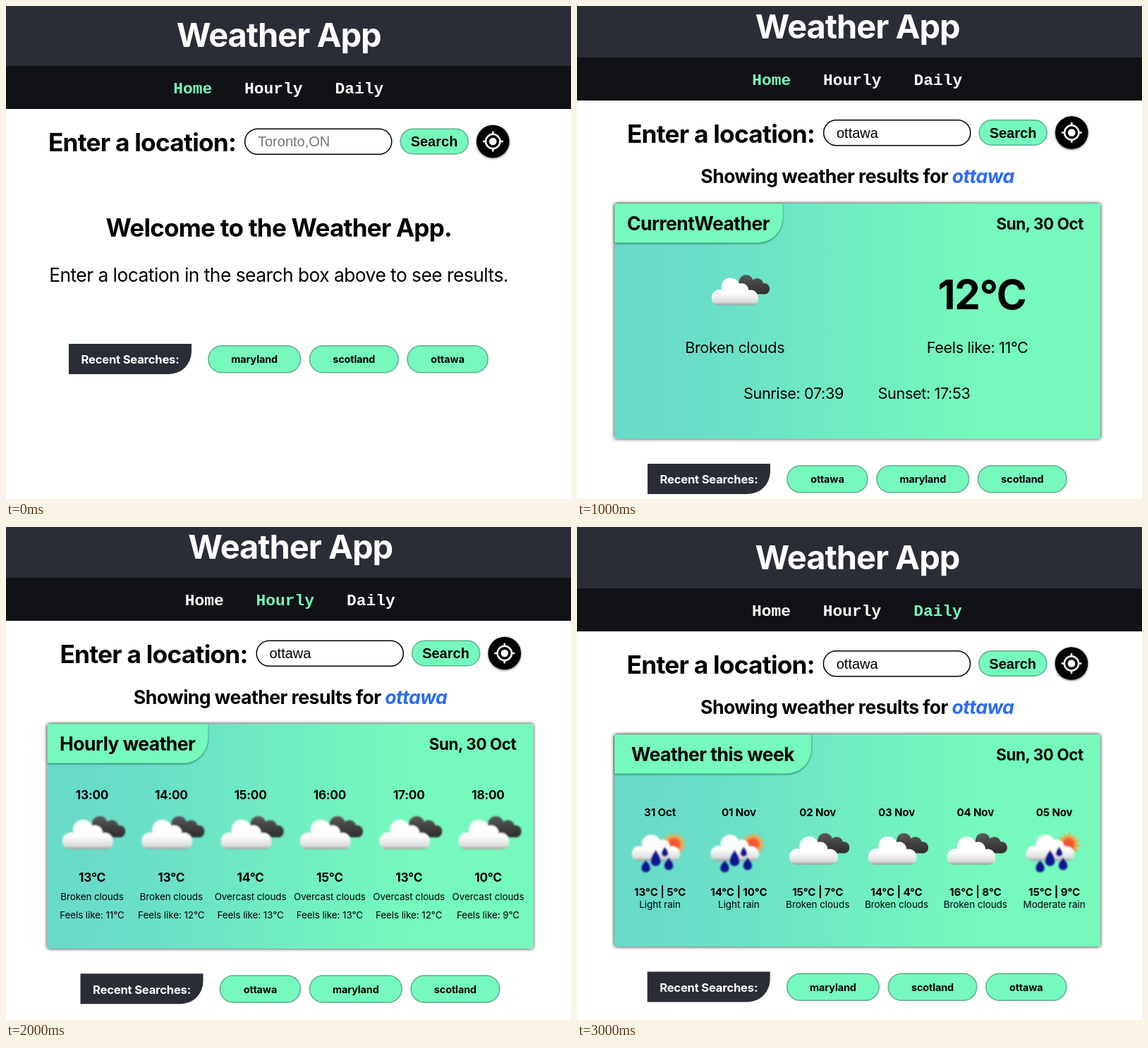
Animation of 801 by 699 pixels, one loop 4 s. Source, as an HTML page:

```html
<!DOCTYPE html>
<html lang="en">
<head>
<meta charset="utf-8">
<title>Weather App</title>
<style>
  html, body { margin: 0; width: 100%; height: 100%; overflow: hidden; background: #fff; }
  svg { display: block; width: 801px; height: 699px; }
  text { font-family: Inter, "Open Sans", sans-serif; text-anchor: middle; }
  .b { font-weight: 700; }
  .arial { font-family: Arial, "Liberation Sans", sans-serif; }
  .mono { font-family: "Courier New", "Liberation Mono", monospace; font-weight: 700; }
  .left { text-anchor: start; }
  .scene { opacity: 0; }
</style>
</head>
<body>
<svg id="stage" viewBox="0 0 801 699">
  <defs>
    <linearGradient id="card">
      <stop offset="0" stop-color="#68dac9"/>
      <stop offset=".2" stop-color="#6adfc8"/>
      <stop offset=".75" stop-color="#75f9bc"/>
      <stop offset="1" stop-color="#75f9bc"/>
    </linearGradient>
    <linearGradient id="light" gradientUnits="userSpaceOnUse" x1="0" y1="6" x2="0" y2="49">
      <stop offset="0" stop-color="#fff"/>
      <stop offset=".55" stop-color="#fdfdfd"/>
      <stop offset=".86" stop-color="#dcdcdc"/>
      <stop offset="1" stop-color="#8d9492"/>
    </linearGradient>
    <linearGradient id="dark" gradientUnits="userSpaceOnUse" x1="0" y1="1" x2="0" y2="31">
      <stop offset="0" stop-color="#5c5c5c"/>
      <stop offset=".5" stop-color="#414141"/>
      <stop offset="1" stop-color="#2e2e2e"/>
    </linearGradient>
    <radialGradient id="sun">
      <stop offset="0" stop-color="#f04a2c"/>
      <stop offset=".7" stop-color="#f0602f"/>
      <stop offset="1" stop-color="#f79a45"/>
    </radialGradient>
    <filter id="soft"><feGaussianBlur stdDeviation=".8"/></filter>
    <filter id="glow" x="-5%" y="-8%" width="110%" height="116%">
      <feDropShadow dx="0" dy="0" stdDeviation="2.8" flood-opacity=".95"/>
    </filter>
    <filter id="drop" x="-20%" y="-20%" width="140%" height="140%">
      <feDropShadow dx="0" dy="1" stdDeviation="1.4" flood-opacity=".6"/>
    </filter>
    <g id="puff" fill="url(#light)">
      <circle cx="-30" cy="36" r="12"/>
      <circle cx="-13" cy="20" r="14"/>
      <circle cx="4" cy="25" r="11"/>
      <circle cx="18" cy="36" r="11.5"/>
      <rect x="-42" y="28" width="72" height="20" rx="10"/>
    </g>
    <g id="clouds" filter="url(#soft)">
      <g fill="url(#dark)">
        <circle cx="11" cy="12" r="11"/>
        <circle cx="28" cy="16" r="9.5"/>
        <circle cx="39" cy="23" r="8"/>
        <rect x="2" y="14" width="45" height="17" rx="8"/>
      </g>
      <use href="#puff"/>
    </g>
    <path id="drop-shape" d="M0-11C3-6 6.5-2 6.5 4A6.5 6.5 0 0 1-6.5 4C-6.5-2-3-6 0-11Z" fill="#0b1391"/>
    <g id="rain" filter="url(#soft)">
      <path id="rays" fill="#f6a54a"/>
      <circle cx="20" cy="18" r="10.5" fill="url(#sun)"/>
      <use href="#puff" transform="translate(0 -1) scale(.95 .88)"/>
      <use href="#drop-shape" transform="translate(-20 49) scale(.95 .8)"/>
      <use href="#drop-shape" transform="translate(-6 37.5) scale(1.08)"/>
      <use href="#drop-shape" transform="translate(7 28.5) scale(.74 .65)"/>
      <use href="#drop-shape" transform="translate(12.5 45.5) scale(.95 .83)"/>
    </g>
  </defs>
</svg>
<script>
const MINT = '#75f9bc', INK = '#2a2d36', EDGE = '#5fae8d';
const stage = document.getElementById('stage');

// Text set with tracking that tightens as the size grows.
const text = (s, x, y, size, cls = '', fill = '#000') => {
  const track = size * (-0.0223 + 0.185 * Math.exp(-0.1745 * size));
  return `<text x="${x}" y="${y}" class="${cls}" fill="${fill}" font-size="${size}" letter-spacing="${track.toFixed(3)}">${s}</text>`;
};
const plain = (s, x, y, size, cls, fill = '#000') =>
  `<text x="${x}" y="${y}" class="${cls}" fill="${fill}" font-size="${size}">${s}</text>`;
const rect = (x, y, w, h, fill, more = '') =>
  `<rect x="${x}" y="${y}" width="${w}" height="${h}" fill="${fill}" ${more}/>`;
const pill = (x, y, w, h, fill, stroke) =>
  rect(x + .7, y + .7, w - 1.4, h - 1.4, fill, `rx="${h / 2 - .7}" stroke="${stroke}" stroke-width="1.5"`);
const tab = (x, y, w, h, r, fill, more = '') =>
  `<path d="M${x} ${y}h${w}v${h - r}a${r} ${r} 0 0 1 ${-r} ${r}H${x}z" fill="${fill}" ${more}/>`;
const icon = (id, x, y, k = 1) =>
  `<use href="#${id}" transform="translate(${x} ${y}) scale(${k})"/>`;
const shift = (x, y, body) => `<g transform="translate(${x} ${y})">${body}</g>`;

const locate = () => {
  let s = '<circle r="23.3" filter="url(#drop)"/><circle r="5.3" fill="#fff"/>' +
    '<circle r="10.2" fill="none" stroke="#fff" stroke-width="2.5"/>';
  for (let a = 0; a < 360; a += 90)
    s += rect(-1.3, -14.4, 2.6, 4, '#fff', `transform="rotate(${a})"`);
  return shift(690.3, 192, s);
};

function header(active, dx, dy, query) {
  const nav = [['Home', 264.8], ['Hourly', 379.3], ['Daily', 500.8]].map(([s, x]) =>
    plain(s, x, 124, 22.9, 'mono', s === active ? MINT : '#fff')).join('');
  const top = Math.round(85 + dy);
  return rect(0, 0, 801, top, INK) + rect(0, top, 801, 61, '#111216') +
    shift(dx, dy,
      text('Weather App', 386.7, 58, 47, 'b', '#fff') + nav +
      text('Enter a location:', 193, 206, 35.3, 'b') +
      pill(338, 173.5, 209.5, 37.5, '#fff', '#000') +
      plain(query || 'Toronto,ON', 357, 199.3, 20, 'arial left', query ? '#000' : '#757575') +
      pill(558.5, 173.5, 97.5, 37, MINT, EDGE) +
      plain('Search', 607, 199.3, 20, 'arial b') + locate() +
      (query ? text(`Showing weather results for <tspan fill="#2b6cf3" font-style="italic">${query}</tspan>`,
        386.5, 263.5, 26.6, 'b') : ''));
}

const pillWidth = { maryland: 132, scotland: 127, ottawa: 115.5 };
function recent(dx, y, names) {
  let x = 286.2;
  const pills = names.map(n => {
    const w = pillWidth[n];
    const s = pill(x, 2, w, 39.5, MINT, EDGE) + text(n, x + w / 2, 27.3, 14.4, 'b');
    x += w + 11.6;
    return s;
  }).join('');
  return shift(dx, y, tab(89, 0, 174, 43, 32, INK) +
    text('Recent Searches:', 176, 28.3, 16.6, 'b', '#fff') + pills);
}

const card = (x, y, h, name, tabW, nameX) =>
  rect(x, y, 688.7, h, 'url(#card)', 'rx="3" filter="url(#glow)"') +
  tab(x, y, tabW, 55.5, 35, MINT, 'filter="url(#drop)"') +
  text(name, nameX, y + 38, 26.5, 'b') +
  text('Sun, 30 Oct', x + 603, y + 37, 22.4, 'b');

const current = () =>
  icon('clouds', 229.6, 380, .922) +
  text('12°C', 574, 430, 58, 'b') +
  [['Broken clouds', 223.7, 492], ['Feels like: 11°C', 567.7, 492],
   ['Sunrise: 07:39', 307, 556.5], ['Sunset: 17:53', 492, 556.5]]
    .map(([s, x, y]) => text(s, x, y, 21.7)).join('');

const hours = [[13, 'Broken', 11], [13, 'Broken', 12], [14, 'Overcast', 13],
  [15, 'Overcast', 13], [13, 'Overcast', 12], [10, 'Overcast', 9]];
const hourly = () => hours.map(([t, sky, feel], i) => {
  const x = 122 + 112.3 * i;
  return text(`${13 + i}:00`, x, 385.5, 17.2, 'b') + icon('clouds', x, 409) +
    text(`${t}°C`, x, 503, 17.3, 'b') + text(`${sky} clouds`, x, 529, 13.4) +
    text(`Feels like: ${feel}°C`, x, 554.5, 13.4);
}).join('');

const days = [['31 Oct', 13, 5, 'Light rain'], ['01 Nov', 14, 10, 'Light rain'],
  ['02 Nov', 15, 7, 'Broken clouds'], ['03 Nov', 14, 4, 'Broken clouds'],
  ['04 Nov', 16, 8, 'Broken clouds'], ['05 Nov', 15, 9, 'Moderate rain']];
const daily = () => days.map(([day, hi, lo, sky], i) => {
  const x = 117.6 + 111.8 * i, wet = sky.endsWith('rain');
  return text(day, x, 410, 15.1, 'b') +
    (wet ? icon('rain', x, 432) : icon('clouds', x, 433, .955)) +
    text(`${hi}°C | ${lo}°C`, x, 523, 15.2, 'b') + text(sky, x, 540, 13.5);
}).join('');

// Sun rays as a twelve-pointed star.
document.getElementById('rays').setAttribute('d', 'M' + Array.from({ length: 24 }, (_, i) => {
  const a = i * Math.PI / 12 + .12, r = i % 2 ? 11 : 18;
  return (20 + r * Math.cos(a)).toFixed(1) + ' ' + (18 + r * Math.sin(a)).toFixed(1);
}).join('L') + 'Z');

const scenes = [
  header('Home', 0, 0) +
    text('Welcome to the Weather App.', 386.7, 327, 35.1, 'b') +
    text('Enter a location in the search box above to see results.', 386.5, 391, 26.4) +
    recent(0, 479, ['maryland', 'scotland', 'ottawa']),
  header('Home', 11, -12.5, 'ottawa') +
    card(53.3, 280, 333.5, 'CurrentWeather', 238, 172) + current() +
    recent(11, 649, ['ottawa', 'maryland', 'scotland']),
  header('Hourly', 16.5, -13, 'ottawa') +
    card(58.6, 279.3, 318.5, 'Hourly weather', 227.5, 172.2) + hourly() +
    recent(16.5, 633.3, ['ottawa', 'maryland', 'scotland']),
  header('Daily', 10.7, 1.5, 'ottawa') +
    card(53, 294, 301, 'Weather this week', 279, 192.5) + daily() +
    recent(10.7, 630.5, ['maryland', 'scotland', 'ottawa'])
];

scenes.forEach((body, i) => {
  const g = document.createElementNS('http://www.w3.org/2000/svg', 'g');
  g.setAttribute('class', 'scene');
  g.innerHTML = body;
  stage.append(g);
  const steps = [0, .25, .5, .75, 1].map((offset, k) =>
    ({ offset, opacity: k === i ? 1 : 0, easing: 'step-end' }));
  g.animate(steps, { duration: 4000, iterations: Infinity });
});
</script>
</body>
</html>
```
